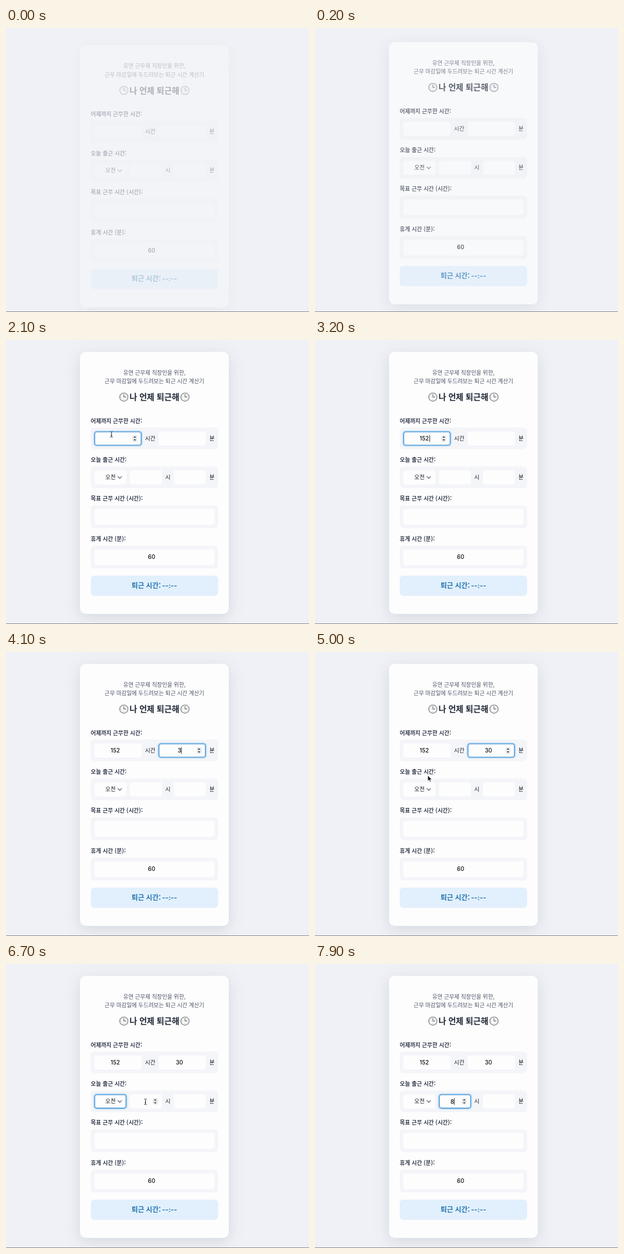
An HTML page that plays this animation: 540 by 506 pixels, repeating every 8 s.

```html
<!DOCTYPE html>
<html lang="ko">
<head>
<meta charset="utf-8">
<title>퇴근 시간 계산기</title>
<style>
  html, body { margin: 0; width: 100%; height: 100%; overflow: hidden; background: #eff1f6; }
  svg { display: block; width: 540px; height: 506px; }
  text { font: 500 10px "Noto Sans CJK KR", "Noto Sans CJK", sans-serif; fill: #16191f; }
  .mid { text-anchor: middle; }
  .sub { font-size: 9.9px; font-weight: 400; fill: #4b5363; }
  .title { font-size: 14.6px; font-weight: 700; fill: #1f2736; }
  .label { font-weight: 600; fill: #353d4d; }
  .num { font-family: Inter, sans-serif; fill: #0c0d10; }
  .result { font-size: 12.2px; font-weight: 700; fill: #2274b2; }
  .dash { font-family: Inter, sans-serif; }
  .shade { filter: drop-shadow(0 7px 14px rgba(45, 55, 90, .13)); }
  .menu { filter: drop-shadow(0 2px 3px rgba(0, 0, 0, .3)); }
</style>
</head>
<body>
<svg id="stage" viewBox="0 0 540 506">
  <defs>
    <radialGradient id="rim"><stop offset=".75" stop-color="#d5d6d9"/><stop offset="1" stop-color="#6d6f75"/></radialGradient>
    <g id="clock">
      <circle r="8" fill="url(#rim)"/>
      <circle r="6.2" fill="#f6f6f6"/>
      <path d="M0-5V0H4" fill="none" stroke="#4b4d52" stroke-width="1"/>
      <path d="M0 5.4V4.4M-5.4 0H-4.4" stroke="#8c8e93" stroke-width=".8"/>
    </g>
  </defs>
  <rect width="540" height="506" fill="#eff1f6"/>
  <g id="card"></g>
  <g id="menu" class="menu"></g>
  <g id="arrow">
    <path d="M0 0V10.2L2.4 8 4 11.6 5.7 10.8 4.1 7.4H7.4Z" fill="#0a0a0a" stroke="#fff" stroke-width=".8"/>
  </g>
  <g id="beam">
    <path d="M-2.3-5Q-.4-5 0-4 .4-5 2.3-5M0-4V4M-2.3 5Q-.4 5 0 4 .4 5 2.3 5M-1.2 1.8H1.2" fill="none" stroke="#fff" stroke-width="2" opacity=".7"/>
    <path d="M-2.3-5Q-.4-5 0-4 .4-5 2.3-5M0-4V4M-2.3 5Q-.4 5 0 4 .4 5 2.3 5M-1.2 1.8H1.2" fill="none" stroke="#16181b" stroke-width="1"/>
  </g>
  <rect y="505" width="540" height="1" fill="#85868a"/>
</svg>
<script>
const LOOP = 8000, STEP = 100;
const $ = id => document.getElementById(id);
const clamp = v => Math.max(0, Math.min(1, v));
const card = $('card'), menu = $('menu');

function add(parent, tag, attrs, text) {
  const el = document.createElementNS('http://www.w3.org/2000/svg', tag);
  for (const k in attrs) el.setAttribute(k, attrs[k]);
  if (text) el.textContent = text;
  parent.append(el);
  return el;
}
const box = (parent, x, y, width, height, rx, fill, more) =>
  add(parent, 'rect', { x, y, width, height, rx, fill, ...more });
const write = (parent, x, y, cls, text) => add(parent, 'text', { x, y, class: cls }, text);
const show = (el, on) => el.setAttribute('opacity', +on);

// Card and headings
box(card, 132, 21, 265, 467, 10, '#fdfdfe', { class: 'shade' });
write(card, 264.5, 61.7, 'sub mid', '유연 근무제 직장인을 위한,');
write(card, 264.5, 77.2, 'sub mid', '근무 마감일에 두드려보는 퇴근 시간 계산기');
write(card, 264.5, 107, 'title mid', '나 언제 퇴근해');
for (const x of [210, 319]) add(card, 'use', { href: '#clock', x, y: 101.7 });

// Rows: label, label baseline, panel top, panel height
for (const [text, base, top, h] of [
  ['어제까지 근무한 시간:', 147.8, 156, 38.5],
  ['오늘 출근 시간:', 217, 225.5, 38.5],
  ['목표 근무 시간 (시간):', 286.2, 294.5, 40.5],
  ['휴게 시간 (분):', 358, 366.5, 40.5]
]) {
  write(card, 151, base, 'label', text);
  box(card, 151, top, 227, h, 6, '#f4f5f8');
}

// start and end are the times of focus and blur
function field(x, y, w, h, start = Infinity, end = Infinity, typed = []) {
  box(card, x, y, w, h, 4, '#fdfdfe');
  const ring = add(card, 'g', { opacity: 0 });
  box(ring, x - .6, y - .6, w + 1.2, h + 1.2, 5, 'none', { stroke: '#c4e0f6', 'stroke-width': 3 });
  box(ring, x + .6, y + .6, w - 1.2, h - 1.2, 4, '#fdfdfe', { stroke: '#3a8dd2', 'stroke-width': 1.4 });
  return { x, y, w, h, start, end, typed, ring };
}

function numberField(...spec) {
  const f = field(...spec), cy = f.y + f.h / 2, sx = f.x + f.w - 12;
  f.mid = f.x + f.w / 2 - 4.8;
  f.value = write(card, f.mid, cy + 3.7, 'num mid', '');
  f.caret = box(card, 0, cy - 6, .9, 12, 0, '#111');
  f.spin = add(card, 'g', { opacity: 0 });
  box(f.spin, sx - 4.3, cy - 5.7, 8.6, 11.4, 2.2, '#e6e7e9');
  add(f.spin, 'path', {
    d: `M${sx - 2.2} ${cy - 1.6}l2.2-2.6 2.2 2.6zM${sx - 2.2} ${cy + 1.6}l2.2 2.6 2.2-2.6z`, fill: '#3c3d40'
  });
  return f;
}

const ampm = field(157.5, 232.3, 57, 25, 5300, 6900);
const numbers = [
  numberField(157.5, 163, 84, 25, 1600, 3500, [[2700, '1'], [2900, '15'], [3100, '152']]),
  numberField(272, 163, 84, 25, 3500, 5300, [[4000, '3'], [4300, '30']]),
  numberField(221, 232.3, 57, 25, 6900, LOOP, [[7500, '8']]),
  numberField(299.3, 232.3, 56.7, 25)
];
const fields = [ampm, ...numbers];
field(157.5, 301, 214, 28);
field(157.5, 373, 214, 28);
write(card, 259.5, 390.2, 'num mid', '60');

write(card, 177, 247.8, '', '오전');
add(card, 'path', { d: 'M199.4 243.2l3.3 3.3 3.3-3.3', fill: 'none', stroke: '#6a7180', 'stroke-width': 1.3, 'stroke-linecap': 'round' });
for (const [x, y, text] of [[257, 178.6, '시간'], [367, 178.6, '분'], [288.3, 247.8, '시'], [367, 247.8, '분']])
  write(card, x, y, 'mid', text);

box(card, 151, 419.7, 227, 36, 6, '#e1f0fc');
write(card, 223.7, 441.8, 'result', '퇴근 시간:');
write(card, 278, 441.8, 'result dash', '--:--');

// Drop-down list
box(menu, 152.7, 234, 57.3, 41, 5, '#d9d9dc', { stroke: '#b9babd', 'stroke-width': .5 });
box(menu, 155.5, 237, 51.5, 17, 3, '#4996fb');
add(menu, 'path', { d: 'M159.6 246l2 2.6 3.6-6', fill: 'none', stroke: '#fff', 'stroke-width': 1.3 });
write(menu, 168, 249.3, '', '오전').style.fill = '#fff';
write(menu, 168, 266.2, '', '오후');

// Pointer path: time, x, y
const path = [
  [900, 91, 236], [1000, 97, 232], [1500, 188, 168],
  [4700, 188, 168], [5200, 208, 248], [6400, 208, 248], [6700, 248.5, 245.5]
];
const visible = [[900, 2700], [4700, 7500]];

function pointer(t) {
  let i = path.findIndex(p => p[0] > t);
  if (i < 0) return path[path.length - 1].slice(1);
  if (i === 0) return path[0].slice(1);
  const [t0, x0, y0] = path[i - 1], [t1, x1, y1] = path[i];
  const k = (t - t0) / (t1 - t0), e = k * k * (3 - 2 * k);
  return [x0 + (x1 - x0) * e, y0 + (y1 - y0) * e];
}

function render(t) {
  const alpha = 1 - .68 * (1 - clamp(t / 600)) ** 2;
  card.setAttribute('opacity', alpha);
  card.setAttribute('transform', `translate(0 ${14 * (1 - alpha)})`);

  const [px, py] = pointer(t);
  const shown = visible.some(([a, b]) => t >= a && t < b);
  const open = t >= 5400 && t < 6300;
  const over = f => shown && !open && px > f.x && px < f.x + f.w && py > f.y && py < f.y + f.h;

  for (const f of fields)
    show(f.ring, clamp((t - f.start) / 200) * (1 - clamp((t - f.end) / 250)));

  for (const f of numbers) {
    const edits = f.typed.filter(e => e[0] <= t);
    const [since, text] = edits.length ? edits[edits.length - 1] : [f.start, ''];
    const active = t >= f.start && t < f.end;
    f.value.textContent = text;
    f.caret.setAttribute('x', f.mid + text.length * 3.1);
    show(f.caret, active && (t - since) % 1000 < 500);
    show(f.spin, active || over(f));
  }

  show(menu, t < 5400 ? 0 : 1 - clamp((t - 6200) / 200));

  const beam = numbers.some(over);
  for (const [id, on] of [['beam', beam], ['arrow', !beam]]) {
    $(id).setAttribute('transform', `translate(${px} ${py})`);
    show($(id), shown && on);
  }
}

const begin = performance.now();
function tick() {
  const t = Math.max(0, performance.now() - begin) % LOOP;
  render(Math.floor(t / STEP) * STEP);
  requestAnimationFrame(tick);
}
tick();
</script>
</body>
</html>
```
